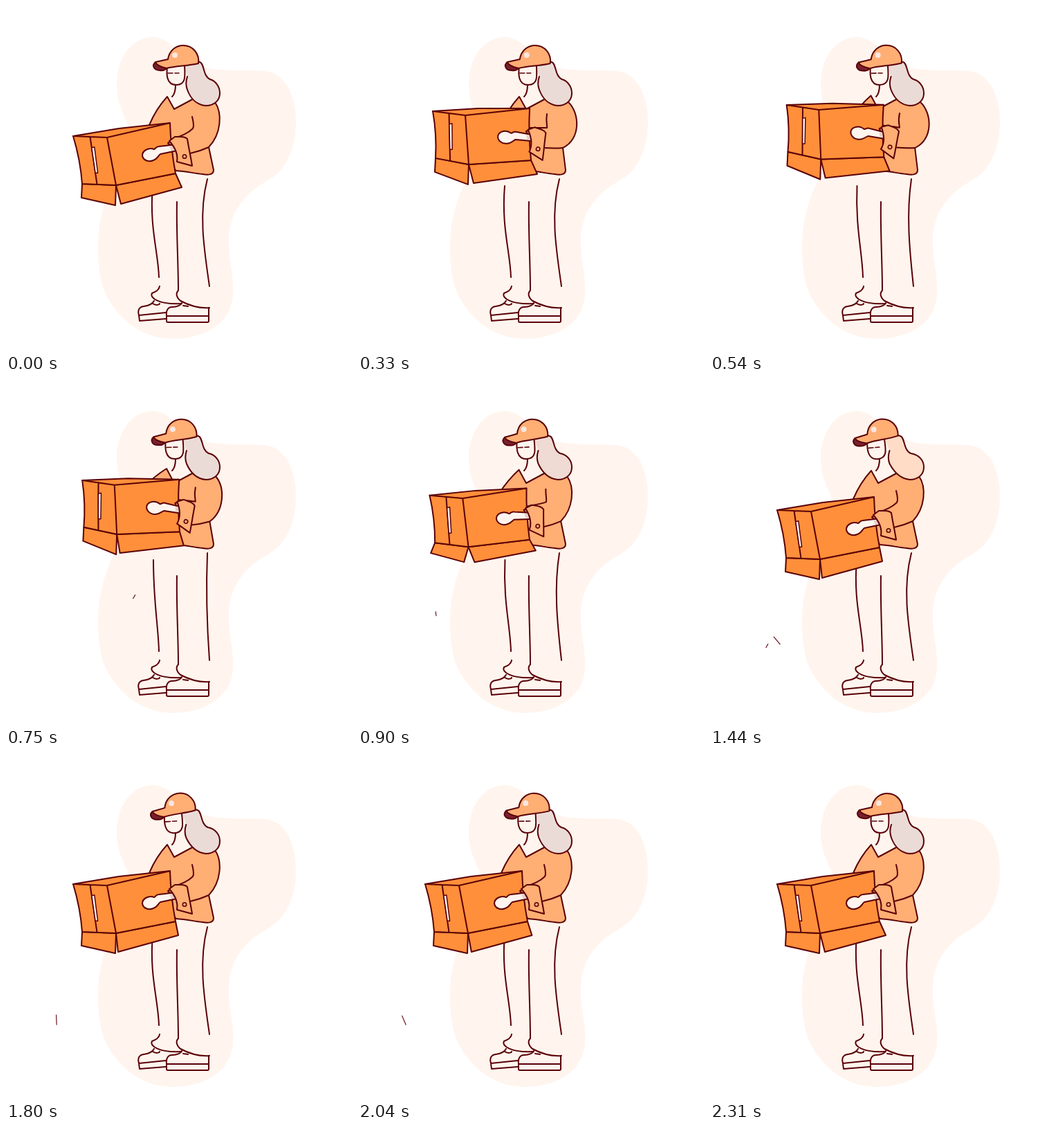
Animation, 500 px wide and 500 px high, one loop 2340 ms. Source, as an HTML page:

```html
<!DOCTYPE html>
<html lang="en">
<head>
<meta charset="utf-8">
<title>Courier with a parcel</title>
<style>
html, body { margin: 0; width: 100%; height: 100%; overflow: hidden; background: #fff; }
svg { display: block; width: 100%; height: 100%; }
</style>
</head>
<body>
<svg id="stage" viewBox="0 0 500 500" fill="none" stroke="#5a0007" stroke-width="2" stroke-linecap="round" stroke-linejoin="round"></svg>
<script>
const LOOP = 2340;
const SHIRT = '#ffae74', CARD = '#ff8f3a', SKIN = '#fff5ee';
const GREY = [235, 219, 214], PEACH = [255, 220, 198];
const stage = document.getElementById('stage');

function make(tag, attrs, parent = stage) {
  const el = document.createElementNS('http://www.w3.org/2000/svg', tag);
  for (const key in attrs) el.setAttribute(key, attrs[key]);
  return parent.appendChild(el);
}
const shape = (d, fill = 'none', attrs = {}, parent = stage) => make('path', { d, fill, ...attrs }, parent);
const set = (el, d) => el.setAttribute('d', d);

function ease(t, a, b) {
  const u = Math.min(1, Math.max(0, (t - a) / (b - a)));
  return u * u * (3 - 2 * u);
}
// Rises from a to b, holds, falls from c to d.
const pulse = (t, a, b, c, d) => ease(t, a, b) * (1 - ease(t, c, d));
const lerp = (a, b, f) => a.map((v, i) => v + (b[i] - v) * f);

// Background, legs, shoes
shape('M212 45C245 45 250 84 300 91C330 95 350 92 375 94C407 98 419 135 419 168C419 210 402 240 377 253C347 269 322 297 322 340C322 372 330 390 328 418C325 460 285 481 242 481C187 481 150 440 138 400C128 350 133 305 150 265C168 225 185 215 182 190C178 165 160 150 160 113C160 77 180 45 212 45Z', SKIN, { stroke: 'none' });
const legs = shape('');
shape('M247 283C246 325 249 370 249 411C245 415 246 421 252 426C265 433 280 437 294 436');
shape('M222 405C221 411 216 413 211 415C207 422 222 432 254 430');
shape('M192 447C190 440 192 435 199 434C207 433 212 430 214 426M231 443L192 447L193 455L231 452M212 430C216 433 222 432 222 430');
shape('M232 448C231 440 234 435 240 435C248 435 253 432 254 429M256 433L263 434M293 436V455Q293 457 291 457H234Q232 457 232 455V448H293');

// Body and head
shape('M244 112L259 108L272 134L243 149L233 131L240 130Z', SKIN, { stroke: 'none' });
const torso = shape('', SHIRT);
const sleeve = shape('');
shape('M245 114C245 122 244 127 240 131');
const hair = shape('');
const head = make('g', {});
shape('M233 88C232 97 231 114 246 114C260 114 259 102 258 86', SKIN, {}, head);
shape('M234 97H241M244 97H250', 'none', { 'stroke-width': 1.6 }, head);
shape('M216 81C210 86 214 93 222 93C228 94 230 92 232 90Z', '#762030', {}, head);
shape('M234 77C236 63 247 57 256 57C270 57 280 69 278 83C262 87 246 86 232 90C224 88 217 85 216 81Z', SHIRT, {}, head);
make('circle', { cx: 244, cy: 71, r: 4, fill: '#f8e6e0', stroke: 'none' }, head);

// Parcel
const leftFlap = shape('', CARD);
const rightFlap = shape('', CARD);
const box = shape('', CARD);
const edges = shape('');
const tape = shape('', '#fff', { 'stroke-width': 1.5 });

// Hand and cuff turn together
const arm = make('g', {});
shape('M234 198L245 190L251 206L241 206Z', '#dc8f62', {}, arm);
shape('M246 200L221 203C216 203 217 206 214 207C206 204 197 209 197 216C198 223 206 226 213 223C219 221 220 216 223 214L247 209', SKIN, {}, arm);
shape('M236 203L245 201L247 208L239 209Z', '#e6cfc8', { stroke: 'none' }, arm);
shape('M236 195L244 189C252 189 258 188 262 192C264 205 267 218 269 231L247 225C249 214 244 204 236 195Z', SHIRT, {}, arm);
make('circle', { cx: 258, cy: 217.5, r: 2.7, 'stroke-width': 1.6 }, arm);

const flecks = [
  { from: 700, to: 1560, at: 750, x: 186, y: 313, dx: -104, dy: 95, kx: .0081, ky: .002, len: 6, deg: 78, swing: 43, beat: 105, phase: 0 },
  { from: 1030, to: 2100, at: 1050, x: 174, y: 285, dx: -114, dy: 100, kx: .0029, ky: .0063, len: 14, deg: 65, swing: 23, beat: 160, phase: Math.PI / 2 }
];
for (const f of flecks) f.el = shape('', 'none', { 'stroke-width': 1.1 });

function drawFleck(f, t) {
  if (t < f.from || t > f.to) return set(f.el, '');
  const u = t - f.at;
  const x = f.x + f.dx * (1 - Math.exp(-f.kx * u));
  const y = f.y + f.dy * (1 - Math.exp(-f.ky * u));
  const a = (f.deg + f.swing * Math.cos(u / f.beat + f.phase)) * Math.PI / 180;
  const dx = Math.cos(a) * f.len / 2, dy = Math.sin(a) * f.len / 2;
  set(f.el, `M${x - dx} ${y - dy}L${x + dx} ${y + dy}`);
}

function drawBody(t, up) {
  const s = 1.08 * pulse(t, 0, 400, 496, 956);
  const w = pulse(t, 330, 750, 750, 1030);
  const tilt = pulse(t, 200, 1440, 1500, 2300);

  set(legs, `M${212 + w} 260C${207 + 6 * w} 320 220 355 221 392M291 250C${278 + 11 * w} 300 ${286 + 4 * w} 350 294 405`);

  const elbow = `${293 + 3 * s} ${204 + s}`;
  set(torso, `M${207 - 9 * w} ${172 - 16 * w}C${212 - w} ${160 - 18 * w} 221 ${144 - 9 * w} ${233 - w} ${131 - 3 * w}`
    + `L243 149L271 134L${302 + 2 * s} 139C${313 + 8 * s} 155 ${311 + 11 * s} ${185 + 8 * s} ${elbow}`
    + 'L300 237C300 245 290 244 284 243C272 242 262 239 246 238L225 220Z');
  set(sleeve, `M${269 + 4 * up} ${160 - 4 * up}C271 168 ${272 + 2 * up} 174 ${270 + 3 * up} ${177 - up}`
    + `C${263 + 2 * up} ${184 - 8 * up} 255 ${187 - 11 * up} ${243 + 4 * up} ${191 - 15 * up}`
    + `M${elbow}Q${280 + 4 * s} ${210 - 4 * s} ${266 + 4 * s} ${213 - 8 * s}`);

  // The crown of the hair follows the head, its tip barely moves.
  const h = 5 * tilt;
  set(hair, `M${256 - h} 82C${264 - h} 77 ${274 - h} 78 ${280 - h} 81C${287 - h} 83 ${284 - h} 101 ${295 - h} 106`
    + `C303 108 309 117 309 126C309 138 299 144 289 144C277 143 267 135 ${262 - h / 2} 121C${259 - h / 2} 113 ${260 - h / 2} 108 ${262 - h / 2} 102`);
  hair.setAttribute('fill', `rgb(${lerp(GREY, PEACH, pulse(t, 750, 1250, 1450, 1790)).map(Math.round)})`);
  head.setAttribute('transform', `rotate(${-h} 247 155)`);
  arm.setAttribute('transform', `translate(${5 * up} ${-25 * up}) rotate(${17 * up} 209 215)`);
}

function drawBox(t, up) {
  const open = pulse(t, 800, 1050, 1050, 1230);
  const loose = pulse(t, 400, 1000, 1800, 2300) * (1 - open);
  const pt = (x, y, dx, dy) => [x + dx * up, y + dy * up];
  const move = (p, x, y) => [p[0] + x, p[1] + y];

  const left = pt(97, 188, 11, -36), back = pt(163, 177, 11, -29), right = pt(237, 169, 11, -21);
  const front = pt(146, 190, 9, -32);
  const footL = pt(110, 257, 2, -37), foot = pt(159, 259, 1, -30), footR = pt(245, 242, 5, -19);
  const bowL = move(lerp(left, footL, .5), 4, 0), bowR = move(lerp(right, footR, .5), -3, 0);

  set(box, `M${left}L${back}L${right}Q${bowR} ${footR}L${foot}L${footL}Q${bowL} ${left}Z`);
  const seamTop = lerp(left, front, .5), seamEnd = lerp(footL, foot, .44);
  set(edges, `M${left}L${front}L${right}M${front}L${foot}M${seamTop}L${seamEnd}`);
  const a = lerp(seamTop, seamEnd, .23), b = lerp(seamTop, seamEnd, .76);
  set(tape, `M${a}L${move(a, 4, -1)}L${move(b, 3.5, 0)}L${b}Z`);

  // Flaps hang from the lower edge and swing outward on landing.
  set(leftFlap, `M${footL}L${move(footL, -1 - 14 * open, 20 - 14 * open)}L${move(foot, -1 - 15 * open, 29 - 20 * open)}L${foot}Z`);
  set(rightFlap, `M${foot}L${move(foot, 7 + 12 * open - 4 * loose, 27 - 14 * open)}L${move(footR, 9 + 8 * open - 5 * loose, 20 - 12 * open)}L${footR}Z`);
}

function draw(t) {
  const up = 1.25 * pulse(t, 0, 463, 704, 1084);
  drawBody(t, up);
  drawBox(t, up);
  for (const f of flecks) drawFleck(f, t);
}

const start = performance.now();
function tick() {
  draw((performance.now() - start) % LOOP);
  requestAnimationFrame(tick);
}
tick();
</script>
</body>
</html>
```
